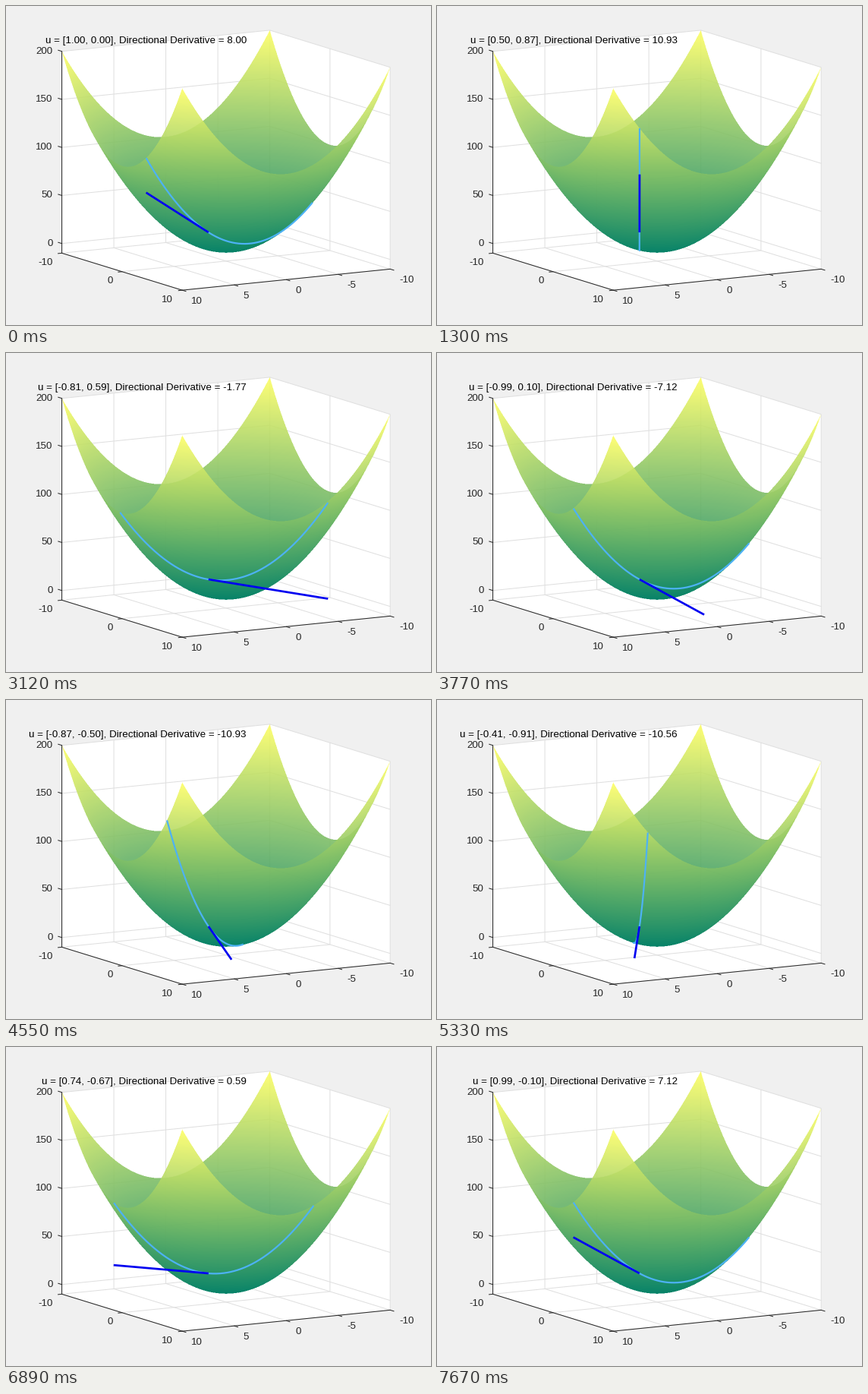
Animation, 560 px wide and 420 px high, one loop 7800 ms. Source, as a matplotlib script:

```python
import numpy as np
import matplotlib.pyplot as plt
from matplotlib.animation import FuncAnimation

W, H, DPI = 560, 420, 100
FRAMES, INTERVAL = 60, 130
LIM, Z_MIN, Z_MAX = 10, -10, 200
ORIGIN = np.array([289.9, 323.2])
EX, EY, EZ = np.array([-13.7, 1.39]), np.array([7.93, 2.44]), np.array([0, -1.265])
INK, GRID, SKY, BLUE = "#262626", "#dfdfdf", "#4db2f5", "#0000f0"
FACE_ALPHA = 0.9
BASE, REACH = 4, 10

# Direction towards the viewer, in data units, with unit x component.
VIEW_Y = -EX[0] / EY[0]
VIEW_Z = -(EX[1] + VIEW_Y * EY[1]) / EZ[1]
VIEW_SQ = 1 + VIEW_Y ** 2


def px(pt):
    """Points per screen pixel."""
    return pt * 72 / DPI


def project(x, y, z):
    x, y, z = np.broadcast_arrays(x, y, z)
    return (ORIGIN[:, None] + np.outer(EX, x) + np.outer(EY, y)
            + np.outer(EZ, z))


def in_box(x, y):
    return (np.abs(x) <= LIM) & (np.abs(y) <= LIM)


def surface_image(sub=2):
    """Cast a ray through each subpixel and blend both hits on z = x² + y²."""
    col, row = np.meshgrid((np.arange(W * sub) + 0.5) / sub - ORIGIN[0],
                           (np.arange(H * sub) + 0.5) / sub - ORIGIN[1])
    det = EX[0] * EY[1] - EY[0] * EX[1]
    x0 = (col * EY[1] - row * EY[0]) / det
    y0 = (row * EX[0] - col * EX[1]) / det
    b = 2 * x0 + 2 * VIEW_Y * y0 - VIEW_Z
    disc = b ** 2 - 4 * VIEW_SQ * (x0 ** 2 + y0 ** 2)
    root = np.sqrt(np.maximum(disc, 0))
    out = np.zeros(col.shape + (4,))
    for sign in (-1, 1):
        s = (-b + sign * root) / (2 * VIEW_SQ)
        hit = (disc >= 0) & in_box(x0 + s, y0 + VIEW_Y * s)
        level = np.clip(VIEW_Z * s / Z_MAX, 0, 1)
        color = np.stack([level, 0.5 + level / 2, np.full_like(level, 0.4),
                          np.ones_like(level)], axis=-1)
        layer = (FACE_ALPHA * hit)[..., None]
        out = color * layer + out * (1 - layer)
    out = out.reshape(H, sub, W, sub, 4).mean(axis=(1, 3))
    out[..., :3] /= np.maximum(out[..., 3:], 1e-6)
    return np.clip(out, 0, 1)


fig = plt.figure(figsize=(W / DPI, H / DPI), dpi=DPI, facecolor="#f0f0f0")
ax = fig.add_axes([0, 0, 1, 1])
ax.axis("off")


def path(points, color, width, order):
    x, y = project(*np.array(points, float).T)
    ax.plot(x, y, color=color, lw=px(width), zorder=order,
            solid_capstyle="butt", solid_joinstyle="miter")


def label(x, y, text, align, color=INK):
    return ax.text(x, y, text, ha=align, va="baseline", color=color,
                   family="Liberation Sans", fontsize=px(13.33), zorder=8)


def tick(point, direction, text, dx, dy, align):
    x, y = project(*point)[:, 0]
    ux, uy = 5 * direction / np.hypot(*direction)
    ax.plot([x, x + ux], [y, y + uy], color=INK, lw=px(1), zorder=3)
    label(x + dx, y + dy, text, align)


def draw_box():
    outline = [(LIM, -LIM, Z_MAX), (-LIM, -LIM, Z_MAX), (-LIM, LIM, Z_MAX),
               (-LIM, LIM, Z_MIN), (LIM, LIM, Z_MIN), (LIM, -LIM, Z_MIN)]
    ax.fill(*project(*np.array(outline).T), color="white", lw=0, zorder=0)
    for x in range(-10, 11, 5):
        path([(x, LIM, Z_MIN), (x, -LIM, Z_MIN), (x, -LIM, Z_MAX)], GRID, 1, 1)
        tick((x, LIM, Z_MIN), EY, str(x), 12, 17.5, "left")
    for y in (-10, 0, 10):
        path([(LIM, y, Z_MIN), (-LIM, y, Z_MIN), (-LIM, y, Z_MAX)], GRID, 1, 1)
        tick((LIM, y, Z_MIN), EX, str(y), -12, 15.5, "right")
    for z in range(0, 201, 50):
        path([(LIM, -LIM, z), (-LIM, -LIM, z), (-LIM, LIM, z)], GRID, 1, 1)
        tick((LIM, -LIM, z), -EY, str(z), -12, 3, "right")
    path([(LIM, -LIM, Z_MAX), (LIM, -LIM, Z_MIN), (LIM, LIM, Z_MIN),
          (-LIM, LIM, Z_MIN)], INK, 1, 3)


draw_box()
ax.imshow(surface_image(), extent=(0, W, H, 0), interpolation="nearest", zorder=2)
ax.set(xlim=(0, W), ylim=(H, 0), aspect="auto")
curve, = ax.plot([], [], color=SKY, lw=px(2.2), zorder=5, solid_capstyle="butt")
tangent, = ax.plot([], [], color=BLUE, lw=px(2.7), zorder=6, solid_capstyle="butt")
title = label(317, 49, "", "right", "black")


def curve_points(ux, uy):
    t = np.linspace(-REACH, REACH, 801)
    x, y = BASE + t * ux, BASE + t * uy
    # Distance along the view ray to the front sheet of the surface.
    s = (VIEW_Z - 2 * x - 2 * VIEW_Y * y) / VIEW_SQ
    hidden = (s > 0.7) & in_box(x + s, y + VIEW_Y * s)
    shown = in_box(x, y) & ~hidden
    return np.where(shown, project(x, y, x ** 2 + y ** 2), np.nan)


def tangent_points(ux, uy, slope):
    height = 2 * BASE ** 2
    limits = [REACH] + [(LIM - BASE) / u for u in (ux, uy) if u > 1e-9]
    if slope < -1e-9:
        limits.append((height - Z_MIN) / -slope)
    t = np.array([0, min(limits)])
    return project(BASE + t * ux, BASE + t * uy, height + t * slope)


def update(i):
    angle = 2 * np.pi * i / FRAMES
    ux, uy = np.round([np.cos(angle), np.sin(angle)], 12) + 0.0
    slope = round(2 * BASE * (ux + uy), 9) + 0.0
    curve.set_data(*curve_points(ux, uy))
    tangent.set_data(*tangent_points(ux, uy, slope))
    title.set_text(f"u = [{ux:.2f}, {uy:.2f}], Directional Derivative = {slope:.2f}")
    return curve, tangent, title


anim = FuncAnimation(fig, update, frames=FRAMES, interval=INTERVAL,
                     repeat=True, repeat_delay=0)
plt.show()
```
